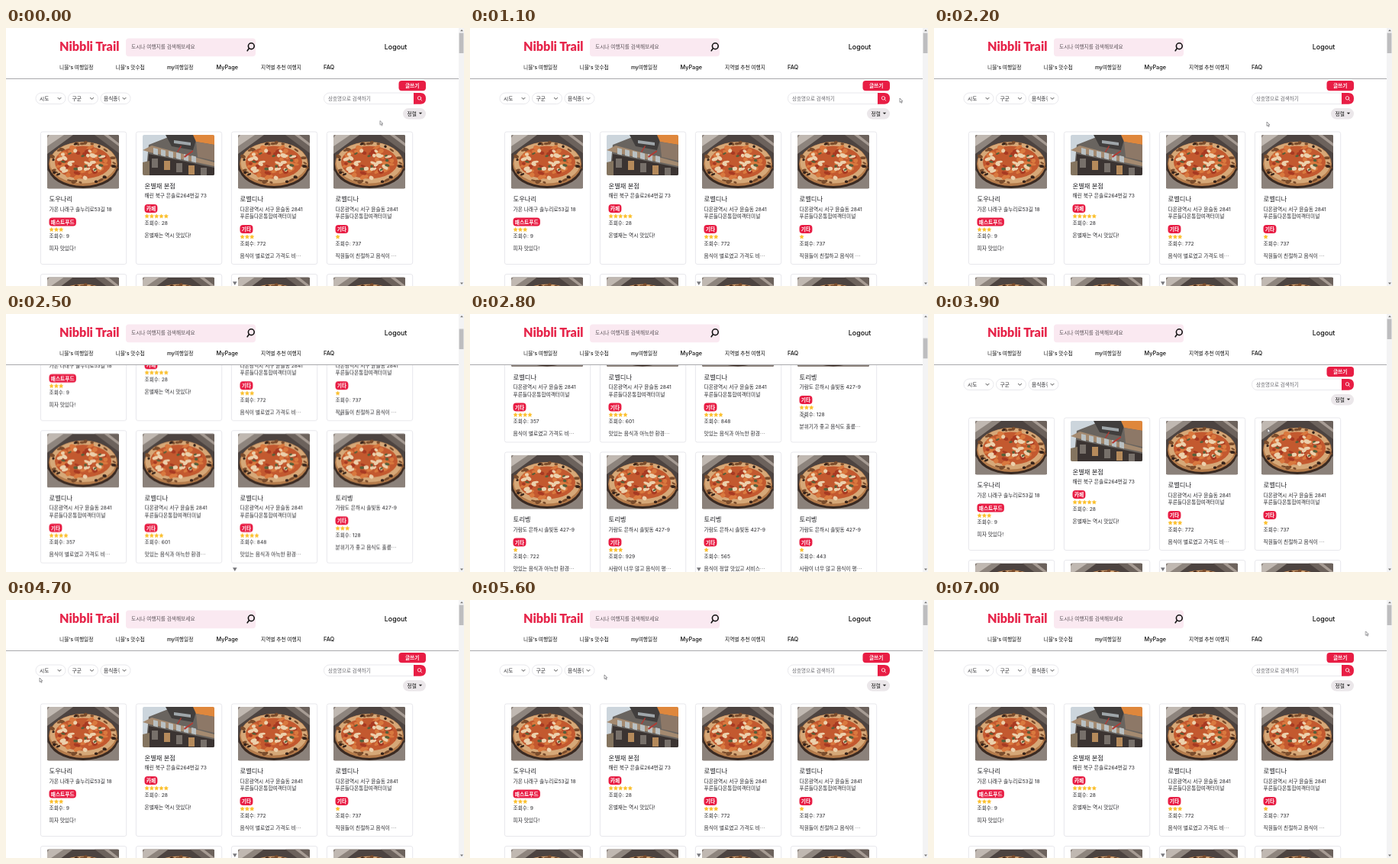
These frames come from a looping animation (600x338 px, 7.1 s). An HTML page:

```html
<!DOCTYPE html>
<html lang="ko">
<head>
<meta charset="utf-8">
<title>Nibbli Trail</title>
<style>
html, body { margin: 0; width: 100%; height: 100%; overflow: hidden; background: #fff; }
svg { display: block; width: 100%; height: 100%; }
text { font: 400 6.7px Inter, 'Noto Sans CJK KR', 'Noto Sans CJK', sans-serif; fill: #26262a; white-space: pre; }
.logo { font: 900 16.2px Lato, sans-serif; fill: #e6264b; }
.out { font-size: 8.9px; font-weight: 500; fill: #111; }
.nav { font-weight: 500; fill: #111; }
.page { font-size: 7.3px; }
.hint { fill: #66666c; }
.ask { fill: #5c545a; font-weight: 500; }
.name { font-size: 8.3px; }
.tag { font-weight: 700; fill: #fff; }
.red { fill: #e81d44; }
.box { fill: #fff; stroke: #dedee4; stroke-width: .7; }
.line { fill: none; stroke: #333; stroke-width: .9; stroke-linecap: round; stroke-linejoin: round; }
#list { animation: scroll 7.1s -10ms infinite; }
#thumb { animation: thumb 7.1s -10ms infinite; }
#cursor { animation: move 7.1s -10ms infinite; }
</style>
</head>
<body>
<svg id="stage" viewBox="0 0 600 338"></svg>
<script>
const FRAMES = 71;
let seed = 11;
const rnd = (a = 0, b = 1) => a + (b - a) * ((seed = seed * 16807 % 2147483647) / 2147483647);

const text = (x, y, s, cls = '', more = '') => `<text x="${x}" y="${y}" class="${cls}" ${more}>${s}</text>`;
const rect = (x, y, w, h, r, attr) => `<rect x="${x}" y="${y}" width="${w}" height="${h}" rx="${r}" ${attr}/>`;
const oval = (x, y, rx, ry, fill, turn = 0) =>
  `<ellipse cx="${x.toFixed(1)}" cy="${y.toFixed(1)}" rx="${rx.toFixed(1)}" ry="${ry.toFixed(1)}" fill="${fill}" transform="rotate(${turn.toFixed(0)} ${x.toFixed(1)} ${y.toFixed(1)})"/>`;
const shape = (d, fill) => `<path d="${d}" fill="${fill}"/>`;
const repeat = (n, fn) => Array.from({ length: n }, (_, i) => fn(i)).join('');

// Toppings spread over the pizza; near and far are shares of its radius.
const scatter = (n, near, far, size, fill) => repeat(n, i => {
  const a = i * 2.4 + rnd(0, .9), r = Math.sqrt(rnd(near * near, far * far));
  return oval(47 + 43 * r * Math.cos(a), 37 + 27 * r * Math.sin(a), size * rnd(.7, 1.4), size * rnd(.4, .8), fill, rnd(-40, 40));
});

const pizza = `<g id="pizza" clip-path="url(#tall)">
  ${rect(0, 0, 94, 70.5, 0, 'fill="#4c4340"')}
  ${shape('M0 0H34L0 25Z', '#8d847d')}${shape('M3 0H22L0 15V4Z', '#c0b8b1')}
  ${shape('M62 0H94V24Z', '#6c625c')}${shape('M74 0H80L94 11V15Z', '#a79c94')}
  ${shape('M0 46Q20 70 47 66T94 46V70.5H0Z', '#8b817a')}
  ${oval(47, 42, 46, 28, '#3a2a22')}${oval(47, 38, 45, 29, '#b47b4b')}${oval(47, 36.5, 43.5, 27, '#d6a878')}
  ${scatter(20, .9, 1, 2.9, '#7a4c2c')}${scatter(9, .92, 1, 2.4, '#35231b')}
  ${oval(47, 36, 37, 21.5, '#c3592f')}
  ${scatter(24, .1, .8, 4, '#d9793f')}${scatter(16, .1, .8, 3.2, '#a83a22')}
  ${scatter(22, .1, .76, 3.4, '#ecd0ac')}${scatter(9, .15, .65, 2.4, '#56603a')}
</g>`;

const shop = `<g id="shop" clip-path="url(#short)">
  ${rect(0, 0, 94, 53, 0, 'fill="#ccd5dc"')}
  ${shape('M8 13L36 2L94 5V53H4Z', '#69645f')}${shape('M30 0H72L66 20L38 15Z', '#413e3d')}
  ${shape('M66 0H94V13L70 9Z', '#df873c')}${shape('M70 9L94 13V34L72 29Z', '#8d7867')}
  ${shape('M0 20L12 14L94 36V41L10 23Z', '#a48a70')}${shape('M8 25L94 43V53H6Z', '#3b3432')}
  ${repeat(6, i => shape(`M${14 + i * 10} ${17 + i * 2}l6 1.4v8l-6 -1.4Z`, '#b9c0c2'))}
  ${repeat(5, i => shape(`M${12 + i * 16} ${31 + i * 3}h8v12h-8Z`, i % 2 ? '#b58a5b' : '#77706a'))}
  ${shape('M41 7L63 10V14L41 11Z', '#9fa6aa')}${shape('M0 36L9 34V53H0Z', '#84745f')}
  ${shape('M45 22L50 14L51 15L46 23ZM54 28L66 20V22L55 30Z', '#b33a33')}
</g>`;

const star = `<path id="star" fill="#fbbf2b" stroke="#fbbf2b" stroke-width=".5" stroke-linejoin="round" d="M${
  Array.from({ length: 10 }, (_, i) => {
    const r = i % 2 ? 1.35 : 2.8, a = i * Math.PI / 5;
    return `${(r * Math.sin(a)).toFixed(2)} ${(-r * Math.cos(a)).toFixed(2)}`;
  }).join('L')}Z"/>`;

const lens = (x, y, r, dx, dy, color, w) =>
  `<g fill="none" stroke="${color}" stroke-width="${w}" stroke-linecap="round"><circle cx="${x}" cy="${y}" r="${r}"/><path d="M${x + Math.sign(dx) * r * .75} ${y + r * .75}l${dx} ${dy}"/></g>`;

const card = (x, y, h, [name, addr, tag, stars, views, note, pic = 'pizza']) => {
  const top = y - (pic === 'shop' ? 17.5 : 0), low = top + (addr.length - 1) * 9.5;
  return rect(x + .4, y, 112.3, h, 2.5, 'class="box"')
    + `<use href="#${pic}" x="${x + 9}" y="${y + 4}"/>`
    + text(x + 11.5, top + 91.2, name, 'name')
    + addr.map((s, i) => text(x + 11.5, top + 103.5 + i * 9.5, s)).join('')
    + rect(x + 11.5, low + 112.4, tag.length * 6.16 + 4.6, 11.2, 4, 'class="red"')
    + text(x + 13.8, low + 120.5, tag, 'tag')
    + repeat(stars, i => `<use href="#star" x="${x + 14.6 + i * 6.3}" y="${low + 128.2}"/>`)
    + text(x + 11.5, low + 139, '조회수: ' + views)
    + text(x + 11.5, low + 155, note);
};

const plaza = ['다온광역시 서구 윤슬동 2841', '푸른들다온통합여객터미널'];
const village = ['가람도 은하시 솔빛동 427-9'];
const bad = '음식이 별로였고 가격도 비⋯', cozy = '맛있는 음식과 아늑한 환경⋯', busy = '사람이 너무 많고 음식이 평⋯';
const robel = (...rest) => ['로벨디나', plaza, '기타', ...rest];
const tori = (...rest) => ['토리벵', village, '기타', ...rest];
const third = [tori(1, 722, cozy), tori(3, 929, busy), tori(1, 565, '음식이 정말 맛있고 서비스⋯'), tori(1, 443, busy)];
const rows = [
  [136, 173.5, [
    ['도우나리', ['가온 나래구 솔누리로53길 18'], '패스트푸드', 3, 9, '피자 맛있다!'],
    ['온별재 본점', ['해린 북구 은솔로264번길 73'], '카페', 5, 28, '온별재는 역시 맛있다!', 'shop'],
    robel(3, 772, bad), robel(1, 737, '직원들이 친절하고 음식이 ⋯')]],
  [322.5, 173.5, [robel(4, 357, bad), robel(4, 601, cozy), robel(4, 848, cozy), tori(3, 128, '분위기가 좋고 음식도 훌륭⋯')]],
  [509, 164, third],
  [686, 164, third]
];

const select = (x, tx, label) => rect(x, 85, 39, 14.5, 7.2, 'class="box"')
  + text(tx, 94.7, label, '', tx > 125 ? 'clip-path="url(#cut)"' : '')
  + `<path class="line" d="M${x + 29} 91.4l2 2l2 -2"/>`;

const filters = rect(514.5, 69, 35.5, 13.2, 4, 'class="red"')
  + text(532.2, 78, '글쓰기', 'tag', 'text-anchor="middle"')
  + select(39, 44, '시도') + select(81.5, 86.5, '구군') + select(124, 128, '음식종류')
  + rect(416.5, 85, 125, 14.6, 7, 'class="box"')
  + text(422, 94.7, '상호명으로 검색하기', 'hint', 'style="font-size:6.5px"')
  + shape('M534 85H543Q550 85 550 92.3T543 99.8H534Z', '#e81d44')
  + lens(541.5, 91.8, 2.2, 1.7, 1.7, '#fff', .8)
  + rect(520, 105, 30, 14.6, 7.3, 'fill="#ebe7ea"')
  + text(525.5, 114.7, '정렬', 'nav') + shape('M540.8 110.7h4.4l-2.2 2.4Z', '#222');

const header = rect(0, 0, 593, 66, 0, 'fill="#fff"') + rect(0, 66, 593, 1, 0, 'fill="#a9a9ac"')
  + text(70, 30, 'Nibbli Trail', 'logo')
  + rect(157, 13.5, 170, 23.7, 4, 'fill="#fae9f1"')
  + text(164, 27.2, '도시나 여행지를 검색해보세요', 'ask')
  + lens(321.3, 23.7, 3.9, -2.2, 3.2, '#111', 1.6)
  + text(495.8, 27.8, 'Logout', 'out')
  + [[70, "니블's 여행일정"], [143.5, "니블's 맛수첩"], [211, 'my여행일정'], [334, '지역별 추천 여행지']]
    .map(([x, s]) => text(x, 54, s, 'nav')).join('')
  + text(275.5, 54, 'MyPage', 'nav page') + text(416, 54, 'FAQ', 'nav page');

const bar = rect(593, 0, 7, 338, 0, 'fill="#f3f3f4"')
  + shape('M595 4.3h4l-2 -2.4ZM595 333.5h4l-2 2.4Z', '#777')
  + rect(593.6, 6.5, 5.8, 26.5, 0, 'id="thumb" fill="#bdbdbf"');

document.getElementById('stage').innerHTML = `<defs>
  <clipPath id="tall">${rect(0, 0, 94, 70.5, 2, '')}</clipPath>
  <clipPath id="short">${rect(0, 0, 94, 53, 2, '')}</clipPath>
  <clipPath id="cut">${rect(125, 85, 23.6, 15, 0, '')}</clipPath>
  ${pizza}${shop}${star}</defs>
  <g id="list">${filters}${rows.map(([y, h, cards]) => cards.map((c, i) => card(45 + i * 125, y, h, c)).join('')).join('')}</g>
  ${header}${bar}
  ${shape('M297 332.3h5.6l-2.8 4.8Z', '#77777b')}
  <path id="cursor" d="M0 0V5.4L1.3 4.3L2.2 6.3L3.1 5.9L2.2 3.9H3.9Z" fill="#fff" stroke="#55555a" stroke-width=".6"/>`;

// Poses are [frame, x, y]; each segment advances once per frame.
const track = (name, poses) => `@keyframes ${name} {${poses.map(([f, x, y], i) => {
  const n = i + 1 < poses.length ? poses[i + 1][0] - f : 1;
  return `${f / FRAMES * 100}% { transform: translate(${x}px, ${y}px); animation-timing-function: steps(${n}, end); }`;
}).join('\n')}}`;

const scroll = [[0, 0], [23, 0], [24, 117], [28, 328], [30, 390], [34, 390], [39, 0], [FRAMES, 0]];
const path = [
  [0, 490, 121.5], [7, 564, 88], [11, 563, 92], [19, 436, 123], [22, 436, 123], [28, 436, 130], [34, 436, 132],
  [39, 437, 150], [41, 437, 150], [46, 28, 104], [48, 60, 100], [55, 176, 98], [57, 176, 98], [63, 578, 60],
  [66, 577, 52], [70, 565.5, 41], [FRAMES, 565.5, 41]
];
const sheet = document.createElement('style');
sheet.textContent = track('scroll', scroll.map(([f, s]) => [f, 0, -s]))
  + track('thumb', scroll.map(([f, s]) => [f, 0, s * .077]))
  + track('move', path);
document.head.append(sheet);
</script>
</body>
</html>
```
